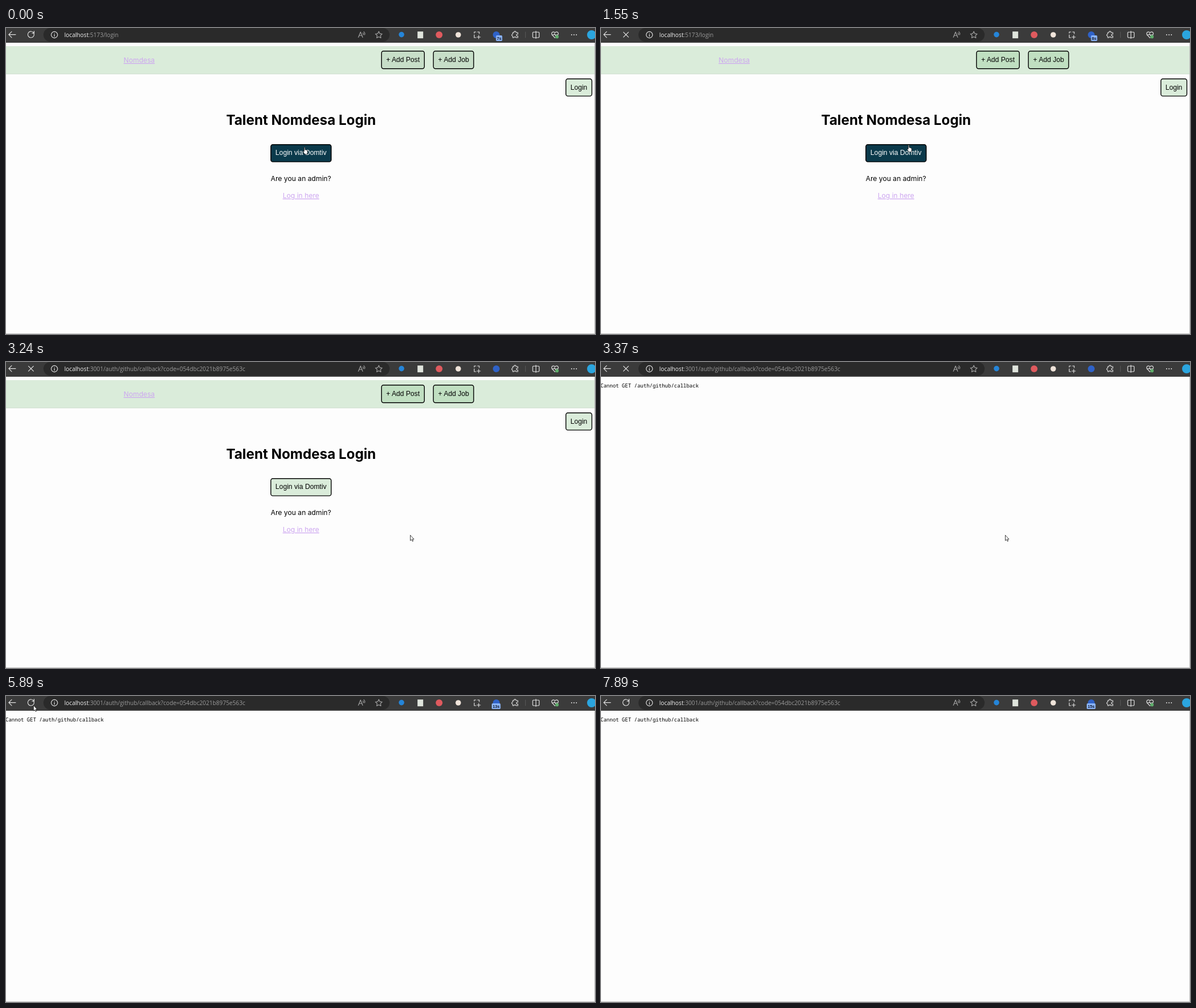
An HTML page for the animation above (9380 ms loop, 1038 px wide and 540 px high).

```html
<!DOCTYPE html>
<html lang="en">
<head>
<meta charset="utf-8">
<title>Login flow</title>
<style>
  html, body { margin: 0; width: 100%; height: 100%; overflow: hidden; background: #fdfdfd; }
  svg { display: block; width: 1038px; height: 540px; }
  text { white-space: pre; }
  .ui { font: 12.16px "Liberation Sans", Arial, sans-serif; text-anchor: middle; }
  .copy { font: 12.16px Inter, sans-serif; }
  .mid { text-anchor: middle; }
  .title { font: 700 24.3px Inter, sans-serif; }
  .link { fill: #cda6f0; text-decoration: underline; }
  .url { font: 10.2px "Open Sans", "Noto Sans", sans-serif; fill: #9a9a9a; }
  .url .host { fill: #f2f2f2; }
  .mono { font: 9.03px "Noto Sans Mono", monospace; }
  .badge { font: 700 7.2px "Liberation Sans", Arial, sans-serif; text-anchor: middle; fill: #10182c; }
  .btn { fill: #daecda; stroke: #000; stroke-width: 1.4; }
  .icon { fill: none; stroke: #e4e4e4; stroke-width: 1.15; stroke-linecap: round; stroke-linejoin: round; }
  .dim { stroke: #a5a5a5; }
  .pointer { fill: #fff; stroke: #111; stroke-width: .8; stroke-linejoin: round; }
</style>
</head>
<body>
<svg viewBox="0 0 1038 540">
  <rect width="1038" height="540" fill="#fdfdfd"/>

  <g id="login">
    <rect y="32" width="1038" height="49" fill="#daecda"/>
    <rect y="80.5" width="1038" height="1" fill="#cbdccb"/>
    <text class="copy link" x="207.3" y="61">Nomdesa</text>
    <g id="adds">
      <rect class="btn" x="661.7" y="40.7" width="75.6" height="31" rx="3.6"/>
      <rect class="btn" x="753.2" y="40.7" width="71" height="31" rx="3.6"/>
    </g>
    <text class="ui" x="699.5" y="60">+ Add Post</text>
    <text class="ui" x="788.8" y="60">+ Add Job</text>
    <rect class="btn" x="986.7" y="89.7" width="45.8" height="30.4" rx="3.6"/>
    <text class="ui" x="1009.5" y="108.6">Login</text>
    <text class="title mid" x="520" y="171">Talent Nomdesa Login</text>
    <rect class="btn" id="cta" x="466.7" y="205.7" width="106.4" height="30.4" rx="3.6"/>
    <text class="ui" id="ctaText" x="519.8" y="224.2">Login via Domtiv</text>
    <text class="copy mid" x="519.8" y="269.5">Are you an admin?</text>
    <text class="copy mid link" x="519.8" y="300">Log in here</text>
  </g>

  <text class="mono" id="error" x="-1" y="45">Cannot GET /auth/github/callback</text>

  <path d="M1037.5 26V539.5H0" fill="none" stroke="#bdbdbd"/>

  <rect width="1038" height="26" fill="#3b3b3b"/>
  <rect x="66" y="0" width="610" height="24" rx="12" fill="#2a2a2a"/>
  <g class="icon">
    <path d="M17 11.6H5M10 6.4L4.8 11.6L10 16.8"/>
    <path id="reload" d="M49.3 10.2A5.5 5.5 0 1 1 47.6 7.4L49.4 9M49.5 5.6V9.2H46"/>
    <path id="stop" d="M39.6 7.4L48.4 16.2M48.4 7.4L39.6 16.2"/>
    <circle cx="85.3" cy="12" r="5.6"/>
    <path d="M85.3 11.4V14.8M85.3 9.2V9.3"/>
    <path class="dim" d="M621 16.5L624.8 7L628.6 16.5M622.3 13.2H627.3M629 8.8Q630.6 10 629.6 12M630.6 6.6Q633.4 9 631.8 12"/>
    <path class="dim" id="star"/>
    <path d="M825.2 9V7H828M831 7H834V10M825.2 12V17H828M833 13V19M830 16H836"/>
    <path d="M893 8H895.2Q895 5.8 897 5.8Q899 5.8 898.8 8H902V11Q899.4 10.8 899.4 12.5Q899.4 14.2 902 14V17H898.8Q899 15.6 897 15.6Q895 15.6 895.2 17H893V14.2Q891.2 14 891.2 12.5Q891.2 11 893 10.8Z"/>
    <path d="M915.5 7V17" stroke="#565656"/>
    <path d="M929.6 7.2H938.2Q939.6 7.2 939.6 8.6V15.6Q939.6 17 938.2 17H929.6Q928.2 17 928.2 15.6V8.6Q928.2 7.2 929.6 7.2ZM933.9 5.6V18.4"/>
    <path d="M967.5 17.5L962.6 12.4Q960.6 9.4 962.8 7.4Q965.4 5.8 967.5 8.4Q969.6 5.8 972.2 7.4Q974.4 9.4 972.4 12.4M962 12H965.4L966.6 10L968.4 13.6L969.4 12H972"/>
  </g>
  <circle cx="971" cy="15.4" r="3" fill="#5fae6b"/>
  <g fill="#e4e4e4"><circle cx="996.8" cy="12" r="1"/><circle cx="1001" cy="12" r="1"/><circle cx="1005.2" cy="12" r="1"/></g>
  <circle cx="697" cy="11.6" r="4.8" fill="#2585d9"/>
  <rect x="725.2" y="6.2" width="10" height="12" fill="#dfe4dc"/>
  <circle cx="763.3" cy="12" r="6" fill="#df5a5e"/>
  <circle cx="797" cy="12" r="4.8" fill="#f0e4da"/>
  <circle cx="864" cy="12" r="6" fill="#2f62c8"/>
  <circle cx="1032" cy="12" r="8" fill="#2ba5df"/>
  <g id="badge">
    <rect id="badgeBox" y="13" height="10" rx="1.8" fill="#8ab4f8"/>
    <text class="badge" id="badgeText" y="20.9"></text>
  </g>
  <text class="url" x="102.8" y="15.8"><tspan class="host">localhost</tspan><tspan id="path"></tspan></text>

  <path class="pointer" id="arrow" d="M.5 .6V10.2L2.7 8.2L4.2 11.5L5.7 10.8L4.3 7.7H7Z"/>
  <path class="pointer" id="hand" d="M2.4 8V1.4Q2.4 .5 3.2 .5Q4 .5 4 1.4V5Q5.2 4.4 5.6 5.4Q6.8 4.9 7.1 6Q8.5 5.6 8.5 7V9.4Q8.5 11.2 7.4 12.8H3.5Q2.6 11 .8 8.8Q.3 7.6 1.2 7.4Q1.8 7.4 2.4 8Z"/>
</svg>
<script>
  const LOOP = 9380;
  const $ = id => document.getElementById(id);
  const show = (id, on) => $(id).style.display = on ? "" : "none";
  const within = (t, from, to) => t >= from && t < to;

  // Each entry holds its value from its start time until the next entry.
  const at = (track, t) => track.findLast(step => step[0] <= t);

  const pointer = [
    [0, 523, 210, "hand"], [140, 531, 199, "arrow"], [300, 512, 313, "arrow"],
    [590, 514, 313, "arrow"], [720, 482, 292, "arrow"], [870, 504, 300, "arrow"],
    [1010, 522, 262, "arrow"], [1140, 534, 227, "arrow"], [1280, 538, 211, "hand"],
    [1410, 539, 206, "hand"], [1970, 676, 285, "arrow"], [2130, 712, 305, "arrow"],
    [5120, 461, 106, "arrow"], [5500, 270, 68, "arrow"], [5630, 126, 40, "arrow"],
    [5890, 48, 16, "arrow"], [6020, 4, 1, "arrow"], [6150, 110, 92, "arrow"],
    [6280, 300, 196, "arrow"], [6410, 433, 254, "arrow"], [6560, 690, 380, "arrow"],
    [6690, 935, 498, "arrow"], [6960, 0, 0, ""], [7100, 835, 435, "arrow"], [7230, 0, 0, ""]
  ];
  const timer = [
    [0, "7s"], [1010, "8s"], [1970, "9s"], [2960, ""], [3970, "11s"],
    [4960, "12s"], [5890, "13s"], [6960, "14s"], [7890, "15s"]
  ];

  $("star").setAttribute("d", "M" + Array.from({ length: 10 }, (_, i) => {
    const r = i % 2 ? 3.1 : 6.3, a = (i / 5 - .5) * Math.PI;
    return `${657 + r * Math.cos(a)} ${12.4 + r * Math.sin(a)}`;
  }).join("L") + "Z");

  function draw(t) {
    const hover = t < 140 || within(t, 1280, 1970);
    $("cta").style.fill = hover ? "#0b3a4b" : "";
    $("ctaText").style.fill = hover ? "#fff" : "";
    for (const box of $("adds").children) box.style.fill = t < 1010 ? "#c7dec8" : "#c0dfc1";

    show("login", t < 3370);
    show("error", t >= 3370);
    const loading = within(t, 1550, 4380);
    show("stop", loading);
    show("reload", !loading);
    $("path").textContent = t < 3240 ? ":5173/login"
      : ":3001/auth/github/callback?code=054dbc2021b8975e563c";

    const label = at(timer, t)[1], wide = label.length > 2;
    show("badge", label);
    $("badgeText").textContent = label;
    $("badgeBox").setAttribute("x", wide ? 856 : 863.5);
    $("badgeBox").setAttribute("width", wide ? 15.5 : 11);
    $("badgeText").setAttribute("x", wide ? 863.8 : 869);

    const [, x, y, kind] = at(pointer, t);
    for (const id of ["arrow", "hand"]) {
      show(id, id === kind);
      $(id).setAttribute("transform", `translate(${x} ${y})`);
    }
  }

  function tick() {
    draw(performance.now() % LOOP);
    requestAnimationFrame(tick);
  }
  tick();
</script>
</body>
</html>
```
